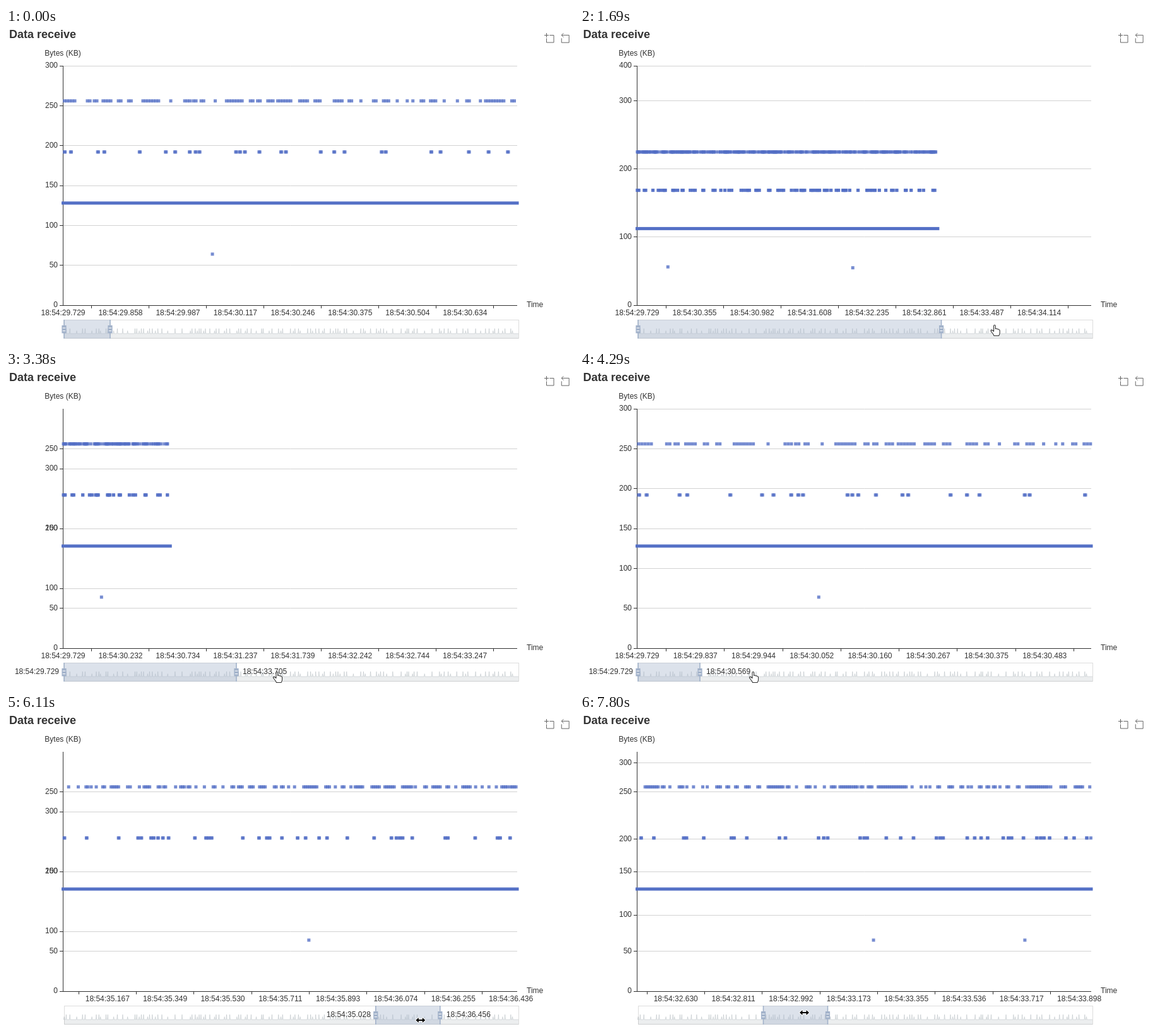
An HTML page with a canvas that plays this animation: 900x500 px, repeating every 8 s.

```html
<!DOCTYPE html>
<html lang="en">
<head>
<meta charset="utf-8">
<title>Data receive</title>
<style>
  html, body { margin: 0; width: 100%; height: 100%; overflow: hidden; background: #fff; }
  canvas { display: block; }
</style>
</head>
<body>
<canvas id="stage" width="900" height="500"></canvas>
<script>
const ctx = document.getElementById('stage').getContext('2d');
const LOOP = 8000, STEP = 130, LAST = 60, PAN_FROM = 40;
const LEFT = 90.5, WIDTH = 719.5, TOP = 60, BOTTOM = 440;
const SLIDER = 92, ITEMS_PER_UNIT = 7.8, PEAK_AT = 330;
const BLUE = '#5470c6', INK = '#333';

// Value through [step, value] key points, eased in and out of each
function at(keys, k) {
  let i = 1;
  while (i < keys.length - 1 && keys[i][0] < k) i++;
  const [k0, v0] = keys[i - 1], [k1, v1] = keys[i];
  const u = Math.min(1, Math.max(0, (k - k0) / (k1 - k0)));
  return v0 + (v1 - v0) * u * u * (3 - 2 * u);
}

function seeded(seed) {
  return () => (seed = (seed * 1664525 + 1013904223) % 4294967296) / 4294967296;
}

// Zoom window in slider units (0 to 720): its right edge is dragged, then the whole window
const windowSize = [[2, 73], [7, 215], [10, 215], [15.8, 720], [22, 720], [25, 284], [26, 273],
  [31, 22], [33, 98], [35, 102]];
const windowStart = [[PAN_FROM, 0], [42, 92.7], [43, 139], [49, 618], [51, 386.8], [52, 350], [59, 198.5]];

function handles(k) {
  const a = at(windowStart, k);
  return [a, a + at(windowSize, k)];
}
// The chart follows the handles one step later
const chartRange = k => handles(Math.max(0, k - 1));
const chartTop = k => {
  const [a, b] = chartRange(k);
  return a < PEAK_AT && b > PEAK_AT ? 400 : 300;
};

// How many steps a property of the chart has kept its value
function stepsSince(property, k) {
  let n = 0;
  while (n < Math.min(k, 5) && String(property(k - n - 1)) === String(property(k))) n++;
  return n;
}

const stamp = p => '18:54:' + (29.729 + p * 0.014).toFixed(3);

function scatter(seed, gap) {
  const random = seeded(seed), places = [];
  for (let p = 0.2; p < 720; p += gap(random)) places.push(p);
  return places;
}
const large = scatter(11, r => r() < 0.6 ? 0.42 : 0.5 + r() * 1.8);
const medium = scatter(5, r => 0.6 + r() ** 2 * 7);
const spikes = scatter(3, r => 2.5 + r() ** 2 * 11);
const rare = [[24, 64], [168, 62.5], [251.6, 64], [285.6, 64], [433.7, 64], [PEAK_AT, 384]];

function line(x1, y1, x2, y2, color) {
  ctx.strokeStyle = color;
  ctx.lineWidth = 1;
  ctx.beginPath();
  ctx.moveTo(x1, y1);
  ctx.lineTo(x2, y2);
  ctx.stroke();
}

function text(str, x, y, align = 'center', font = '12px') {
  ctx.font = font + ' "Liberation Sans", Arial, sans-serif';
  ctx.textAlign = align;
  ctx.textBaseline = 'middle';
  ctx.fillStyle = INK;
  ctx.fillText(str, x, y);
}

function icon(path, x, y, scale) {
  ctx.save();
  ctx.translate(x, y);
  ctx.scale(scale, scale);
  ctx.lineWidth = 1 / scale;
  ctx.strokeStyle = '#666';
  ctx.stroke(new Path2D(path));
  ctx.restore();
}

const crisp = v => Math.floor(v) + 0.5;

function drawYAxis(k, lag) {
  const top = chartTop(k), since = stepsSince(chartTop, k);
  const before = chartTop(Math.max(0, k - since - 1));
  const u = Math.min(1, (lag + since * STEP) / 300);
  const eased = 1 - (1 - u) ** 3;
  const place = (v, max) => BOTTOM - v / max * (BOTTOM - TOP);
  const step = top === 400 ? 100 : 50;
  for (let v = 0; v <= top; v += step) {
    let y = place(v, top);
    // Values known to both scales glide, new ones appear in place
    if (before !== top && v % 100 === 0 && v <= before) y = place(v, before) + (y - place(v, before)) * eased;
    if (v) line(LEFT, crisp(y), 810, crisp(y), '#d2d2d2');
    line(85, crisp(y), 90, crisp(y), INK);
    text(v, 82, y, 'right');
  }
}

function drawXAxis(a, b) {
  const step = Math.ceil((b - a) * ITEMS_PER_UNIT * 91 / 720) / ITEMS_PER_UNIT;
  const spacing = step / (b - a) * WIDTH;
  for (let i = Math.ceil(a / step); i * step < b + step; i++) {
    const x = LEFT + (i - a / step) * spacing;
    const tick = crisp(x - spacing / 2);
    if (tick > LEFT && tick < 810) line(tick, 440, tick, 445, INK);
    if (x <= 810) text(stamp(i * step), x, 453);
  }
}

function drawSamples(k, a, b, lag) {
  const top = chartTop(k);
  // Long ranges are painted progressively from the left
  const painted = 67 + 2.2 * (lag + stepsSince(chartRange, k) * STEP);
  const end = b - a > 220 ? Math.min(b, a + painted) : b;
  const toX = p => LEFT + (p - a) / (b - a) * WIDTH;
  const toY = v => BOTTOM - v / top * (BOTTOM - TOP);
  const dot = (p, v) => {
    if (p >= a && p <= end) ctx.fillRect(toX(p) - 2.5, toY(v) - 2.5, 5, 5);
  };
  ctx.fillStyle = BLUE;
  ctx.fillRect(LEFT - 2.5, toY(128) - 2.5, toX(end) - LEFT + 5, 5);
  ctx.globalAlpha = 0.8;
  for (const p of large) dot(p, 256);
  for (const p of medium) {
    dot(p, 192);
    dot(p + 1 / ITEMS_PER_UNIT, 192);
  }
  for (const [p, v] of rare) dot(p, v);
  ctx.globalAlpha = 1;
}

function drawHandle(x) {
  ctx.fillStyle = '#a2b2ca';
  ctx.fillRect(x - 0.8, 463, 1.6, 30);
  ctx.fillRect(x - 3.6, 472, 7.2, 12.5);
  ctx.fillStyle = '#eef1f6';
  ctx.fillRect(x - 2.2, 475.5, 4.4, 1.3);
  ctx.fillRect(x - 2.2, 480, 4.4, 1.3);
}

function drawSlider(k, a, b) {
  ctx.strokeStyle = '#ddd';
  ctx.lineWidth = 1;
  ctx.strokeRect(SLIDER + 0.5, 463.5, 720, 29);

  const shadow = new Path2D();
  shadow.moveTo(SLIDER, 485);
  spikes.forEach((p, i) => {
    shadow.lineTo(SLIDER + p - 0.8, 485);
    shadow.lineTo(SLIDER + p, i % 3 ? 477 : 480.5);
    shadow.lineTo(SLIDER + p + 0.8, 485);
  });
  shadow.lineTo(812, 485);
  ctx.strokeStyle = 'rgba(47,69,84,.3)';
  ctx.lineWidth = 0.5;
  ctx.stroke(shadow);
  shadow.lineTo(812, 493);
  shadow.lineTo(SLIDER, 493);
  ctx.fillStyle = 'rgba(47,69,84,.09)';
  ctx.fill(shadow);

  const [h0, h1] = handles(k).map(p => SLIDER + p);
  ctx.fillStyle = 'rgba(167,183,204,.4)';
  ctx.fillRect(h0, 463, h1 - h0, 30);
  drawHandle(h0);
  drawHandle(h1);
  if (k >= 23 && k < 58) {
    text(stamp(a), h0 - 8, 478, 'right');
    text(stamp(b), h1 + 10, 478, 'left');
  }
}

const HAND = new Path2D('M-2 -7Q-2 -8.5 -.7 -8.5Q.7 -8.5 .7 -7V-2.5Q2.5 -3.6 3.4 -2Q5 -2.8 5.8 -1.2' +
  'Q7.6 -1.6 7.6 .5V4Q7.6 6 6 8.5H-1.5Q-2.5 6 -5 3Q-7.5 .2 -6 -.5Q-4.7 -1 -2 1.5Z');
const ARROWS = new Path2D('M-7.5 0L-3 -4V-1H3V-4L7.5 0L3 4V1H-3V4Z');

function drawCursor(k) {
  if (k < 1) return;
  const [a, b] = handles(k), [a0, b0] = handles(k - 1);
  const pan = k >= PAN_FROM;
  let x, y;
  if (pan) {
    x = SLIDER + (a + b) / 2 + (a < a0 ? -10 : 14 + Math.min(6, a - a0));
    y = 486 - Math.max(0, k - 52) * 1.5;
  } else {
    x = SLIDER + b + Math.min(75, (k - 1) * 12.5) + 10 * Math.sign(b - b0);
    y = k < 20 ? Math.max(480, 500 - k * 7) : 486;
  }
  ctx.save();
  ctx.translate(x, y);
  ctx.lineJoin = 'round';
  ctx.lineWidth = pan ? 2 : 1.1;
  ctx.strokeStyle = pan ? '#fff' : INK;
  ctx.fillStyle = pan ? '#000' : '#fff';
  const shape = pan ? ARROWS : HAND;
  if (pan) ctx.stroke(shape);
  ctx.fill(shape);
  if (!pan) ctx.stroke(shape);
  ctx.restore();
}

function draw(now) {
  const k = Math.min(LAST, Math.floor(now % LOOP / STEP));
  const [a, b] = chartRange(k);
  const lag = k < 20 ? 76 : 0; // ms since the chart was last refreshed
  ctx.fillStyle = '#fff';
  ctx.fillRect(0, 0, 900, 500);

  text('Data receive', 5, 11, 'left', 'bold 18px');
  icon('M0,13.5H27 M13.5,27V0 M32,13.5H58V58H13.5V32', 853, 8, 0.2586);
  icon('M22,1.4L10,13.5L22,25.8 M10,13.5H55V58H10V32', 877.6, 7.8, 0.2646);
  text('Bytes (KB)', 90, 40.5);
  text('Time', 825, 440, 'left');

  drawYAxis(k, lag);
  line(LEFT, TOP, LEFT, 441, INK);
  line(90, 440.5, 810, 440.5, INK);
  drawXAxis(a, b);
  drawSamples(k, a, b, lag);
  drawSlider(k, a, b);
  drawCursor(k);
}

let began;
function tick(now) {
  began ??= now;
  draw(now - began);
  requestAnimationFrame(tick);
}
requestAnimationFrame(tick);
</script>
</body>
</html>
```
